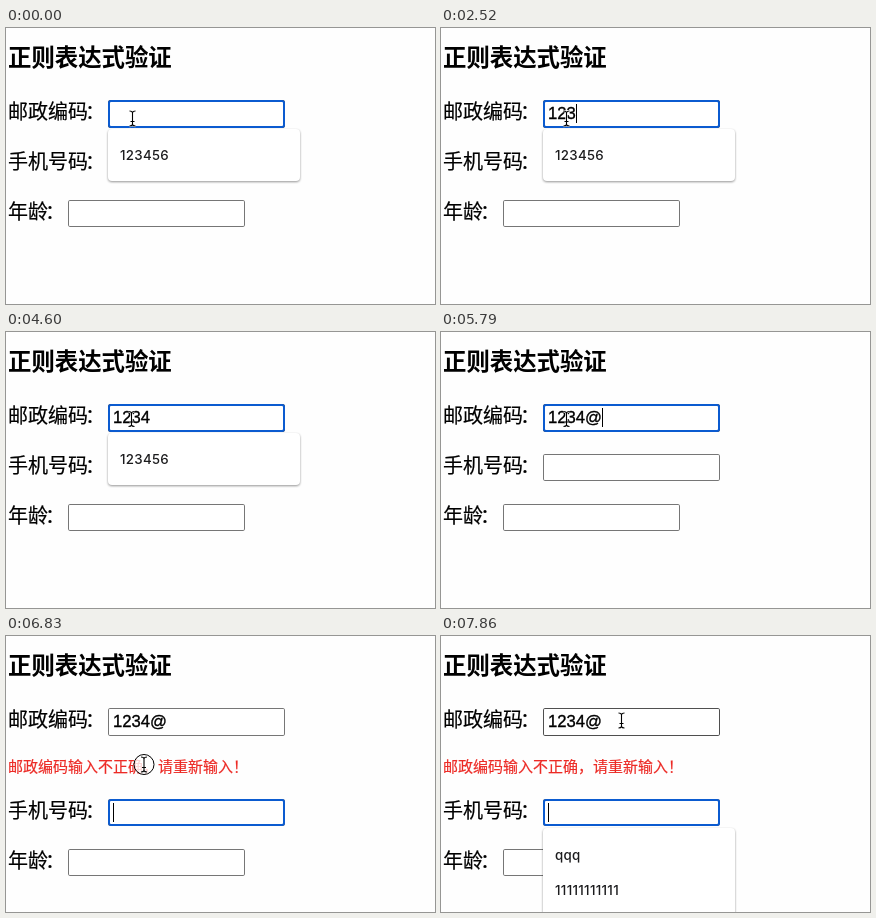
These frames come from a looping animation (429x276 px, 8000 ms). An HTML page:

```html
<!DOCTYPE html>
<html lang="zh-CN">
<head>
<meta charset="utf-8">
<title>正则表达式验证</title>
<style>
  html, body { margin: 0; width: 100%; height: 100%; overflow: hidden; background: #fefefe; }
  svg { display: block; width: 429px; height: 276px; }
  text { font-family: "Noto Sans CJK SC", "Noto Sans CJK", sans-serif; font-size: 20px; fill: #000; stroke: #000; stroke-width: .2; }
  .title { font-size: 23.4px; font-weight: 700; stroke: none; }
  .error { font-size: 15px; fill: #ec2a25; stroke: #ec2a25; }
  .value { font-family: "Liberation Sans", Arial, sans-serif; font-size: 16.67px; stroke-width: .35; }
  .popup text { font-family: Inter, sans-serif; font-size: 13.3px; font-weight: 500; letter-spacing: .3px; fill: #1c1c1e; stroke: none; }
  .popup rect { fill: #fff; filter: drop-shadow(0 1px 1.3px rgba(0, 0, 0, .42)); }
  .field { fill: #fff; stroke: #767676; }
  .hover { stroke: #4f4f4f; }
  .focus { fill: none; stroke: #0b5bd0; stroke-width: 2; }
  #pointer path { fill: none; stroke: #000; stroke-width: 1.1; }
  #pointer .halo { stroke: #fff; stroke-width: 2.6; opacity: .8; }
</style>
</head>
<body>
<svg viewBox="0 0 429 276">
  <text class="title" x="2" y="38.2">正则表达式验证</text>

  <text x="2" y="91.4">邮政编码<tspan dx="-3">：</tspan></text>
  <rect class="field" id="zip" x="102.5" y="72.5" width="176" height="27" rx="1.3"/>
  <text class="value" id="value" x="107" y="91"></text>

  <text class="error" id="error" x="2" y="136">邮政编码输入不正确，请重新输入！</text>

  <g id="lower">
    <text x="2" y="141.2">手机号码<tspan dx="-3">：</tspan></text>
    <rect class="field" id="phone" x="102.5" y="122.5" width="176" height="26" rx="1.3"/>
    <text x="2" y="190.6">年龄<tspan dx="-3">：</tspan></text>
    <rect class="field" x="62.5" y="172.5" width="176" height="26" rx="1.3"/>
  </g>

  <rect class="focus" id="focus" x="103" width="175" rx="2"/>
  <rect id="caret" width="1" height="19"/>

  <g class="popup" id="zipPopup" transform="translate(102 101)">
    <rect width="192" height="52" rx="4"/>
    <text x="12" y="31.3">123456</text>
  </g>
  <g class="popup" id="phonePopup" transform="translate(102 192)">
    <rect width="192" height="110" rx="4"/>
    <text x="12" y="32">qqq</text>
    <text x="12" y="67">11111111111</text>
  </g>

  <g id="pointer">
    <circle id="click" r="10" fill="#fff" fill-opacity=".8" stroke="#000"/>
    <path class="halo"/>
    <path/>
  </g>
</svg>
<script>
  const $ = id => document.getElementById(id);
  const show = (id, on) => $(id).setAttribute('visibility', on ? 'visible' : 'hidden');
  const set = (id, attrs) => {
    for (const key in attrs) $(id).setAttribute(key, attrs[key]);
  };

  const LOOP = 8000, TICK = LOOP / 54;
  const BLINK = 500, KEY_LAG = 140;
  const KEYS = [
    { char: '1', at: 4 }, { char: '2', at: 6 }, { char: '3', at: 9 },
    { char: '4', at: 21 }, { char: '@', at: 39 }
  ];
  const CLICK = 46, SUGGEST = 47;
  const CLOSE = KEYS[KEYS.length - 1].at;

  // The pointer eases between these resting points.
  const PATH = [
    { at: 0, x: 126.5, y: 90.5 }, { at: 17, x: 125.5, y: 90.5 },
    { at: 22, x: 125.5, y: 87 }, { at: 42, x: 125.5, y: 87 },
    { at: 45, x: 138, y: 128.5 }, { at: 49, x: 138, y: 128.5 },
    { at: 52, x: 180.5, y: 75 }, { at: 53, x: 180.5, y: 84.5 }
  ];

  function pointerAt(tick) {
    const next = PATH.findIndex(p => p.at > tick);
    if (next < 0) return PATH[PATH.length - 1];
    const a = PATH[next - 1], b = PATH[next];
    const u = (tick - a.at) / (b.at - a.at);
    const ease = u * u * (3 - 2 * u);
    return { x: a.x + (b.x - a.x) * ease, y: a.y + (b.y - a.y) * ease };
  }

  // The caret stays lit after each key or click, then blinks.
  function caretLit(tick, lastInput) {
    const idle = (tick - lastInput) * TICK + KEY_LAG;
    return Math.floor(idle / BLINK) % 2 === 0;
  }

  const beam = 'M-3 -7.5Q-.4 -7.5 0 -6Q.4 -7.5 3 -7.5M0 -6V6M-3 7.5Q-.4 7.5 0 6Q.4 7.5 3 7.5M-2 3H2';
  document.querySelectorAll('#pointer path').forEach(p => p.setAttribute('d', beam));

  function draw(tick) {
    const typed = KEYS.filter(key => key.at <= tick);
    const blurred = tick >= CLICK;
    const lastInput = blurred ? CLICK : typed.length ? typed[typed.length - 1].at : -4;
    const { x, y } = pointerAt(tick);

    $('value').textContent = typed.map(key => key.char).join('');
    const width = typed.length ? $('value').getComputedTextLength() : 0;
    set('caret', { x: 107 + (blurred ? 0 : Math.round(width)), y: blurred ? 167 : 76 });
    show('caret', caretLit(tick, lastInput));

    set('focus', { y: blurred ? 164 : 73, height: blurred ? 25 : 26 });
    set('lower', { transform: `translate(0 ${blurred ? 41 : 0})` });
    $('zip').classList.toggle('hover', y > 72 && y < 100);
    $('phone').classList.toggle('hover', !blurred && y > 122);
    show('error', blurred);
    show('zipPopup', tick < CLOSE);
    show('phonePopup', tick >= SUGGEST);

    set('pointer', { transform: `translate(${x} ${y})` });
    show('click', blurred && tick < SUGGEST);
  }

  const start = performance.now();
  function frame() {
    const time = (performance.now() - start) % LOOP;
    draw(Math.floor((time + 4) / TICK));
    requestAnimationFrame(frame);
  }
  frame();
</script>
</body>
</html>
```
